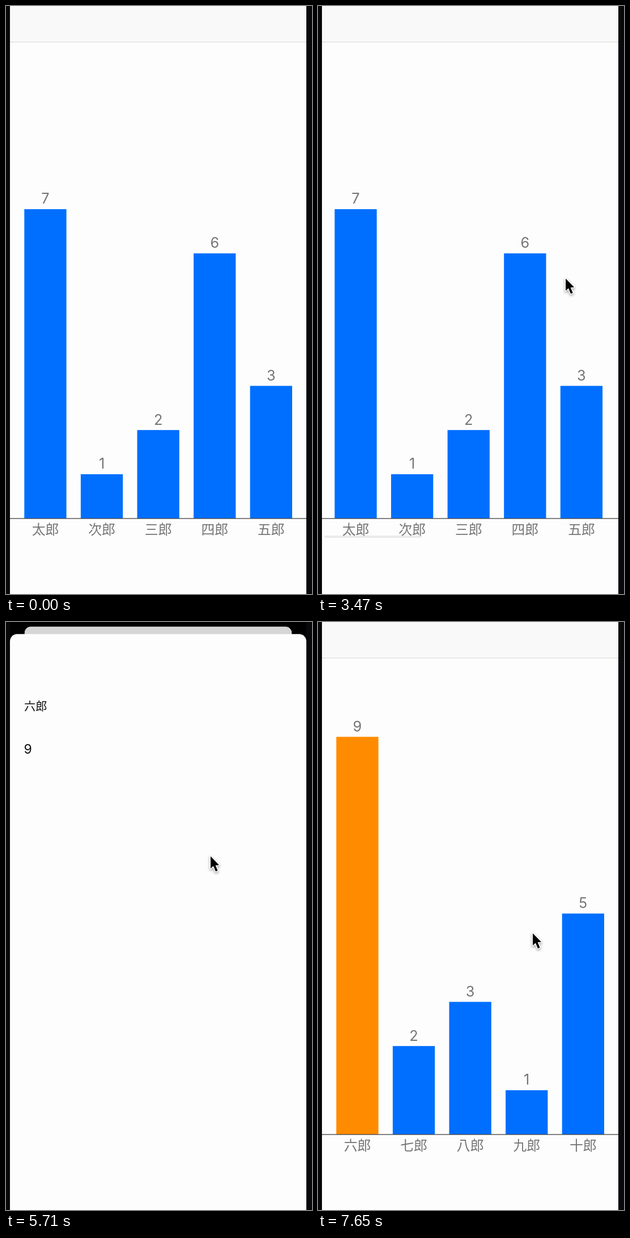
These frames come from a looping animation (540 by 1036 pixels, 7710 ms). An HTML page with a canvas:

```html
<!DOCTYPE html>
<html lang="ja">
<head>
<meta charset="utf-8">
<title>Bar chart</title>
<style>
  html, body { margin: 0; width: 100%; height: 100%; overflow: hidden; background: #000; }
  canvas { display: block; width: 540px; height: 1036px; }
</style>
</head>
<body>
<canvas id="stage" width="540" height="1036"></canvas>
<script>
const ctx = document.getElementById('stage').getContext('2d');
const LOOP = 7710;

// Phone screen; its top and bottom lie outside the stage.
const LEFT = 7, WIDTH = 523, TOP = -47, BOTTOM = 1085, MID = LEFT + WIDTH / 2;
const SHEET_TOP = 21.2, TRAVEL = BOTTOM - SHEET_TOP;
const SCREEN_R = 50, CARD_R = 12.6;
const BASE = 902.8, UNIT = 77.83, BAR = 74.3, GAP = 25.3;
const DIGITS = 'Inter, "Liberation Sans", sans-serif';
const KANJI = '"Noto Sans CJK JP", "Noto Sans CJK", sans-serif';

const pages = [
  { names: ['太郎', '次郎', '三郎', '四郎', '五郎'], values: [7, 1, 2, 6, 3] },
  { names: ['六郎', '七郎', '八郎', '九郎', '十郎'], values: [9, 2, 3, 1, 5] }
];
const MAX = 9;

// Each sheet: opens, is dragged down to dropY, then released.
const sheets = [
  { open: 871, drag: 2490, release: 2601, dropY: 86, name: '四郎', value: 6 },
  { open: 4802, drag: 5960, release: 6098, dropY: 160, name: '六郎', value: 9 }
];

const SWIPE = { start: 3460, end: 3636, pull: 260, tau: 100 };

// Pointer stops: time, x, y
const pointer = [
  [150, 548, 760], [680, 374, 625], [1750, 374, 625], [2350, 258, 592], [2490, 258, 592],
  [2601, 258, 657], [2850, 258, 657], [3380, 440, 480], [3460, 440, 480], [3636, 180, 457],
  [4100, 180, 457], [4650, 77, 465], [5200, 77, 465], [5800, 379, 409], [5960, 379, 409],
  [6098, 379, 548]
];

const clamp = v => Math.min(1, Math.max(0, v));
const mix = (a, b, k) => a + (b - a) * k;
const smooth = k => k * k * (3 - 2 * k);
const span = (t, a, b) => clamp((t - a) / (b - a));

// Remaining distance of a critically damped spring
function spring(ms) {
  const x = Math.max(0, ms) * 0.01826;
  return (1 + x) * Math.exp(-x);
}

function sheetState(t) {
  const sheet = sheets.find(s => t >= s.open && t < s.release + 700);
  if (!sheet) return null;
  if (t < sheet.drag) {
    const p = 1 - spring(t - sheet.open);
    return { sheet, y: BOTTOM - TRAVEL * p, shrink: p, shift: p };
  }
  const y = mix(SHEET_TOP, sheet.dropY, smooth(span(t, sheet.drag, sheet.release)));
  const shift = 1 - 1.28 * (y - SHEET_TOP) / TRAVEL;
  const r = spring(t - sheet.release);
  return { sheet, y: BOTTOM - (BOTTOM - y) * r, shrink: r, shift: shift * r };
}

function scrollOffset(t) {
  if (t < SWIPE.end) return SWIPE.pull * smooth(span(t, SWIPE.start, SWIPE.end));
  const rest = (WIDTH - SWIPE.pull) * Math.exp((SWIPE.end - t) / SWIPE.tau);
  return rest < 0.3 ? WIDTH : WIDTH - rest;
}

function rect(x, y, w, h, color) {
  ctx.fillStyle = color;
  ctx.fillRect(x, y, w, h);
}

function roundPath(x, y, w, h, r) {
  ctx.beginPath();
  ctx.roundRect(x, y, w, h, r);
}

function label(str, x, y, size, family, color, align = 'center', weight = 400) {
  ctx.font = `${weight} ${size}px ${family}`;
  ctx.textAlign = align;
  ctx.fillStyle = color;
  ctx.fillText(str, x, y);
}

function drawPage(page, left) {
  page.values.forEach((v, i) => {
    const x = left + GAP + i * (BAR + GAP), y = BASE - v * UNIT, mid = x + BAR / 2;
    rect(x, y, BAR, BASE - y, v === MAX ? '#ff8b00' : '#006fff');
    label(v, mid, y - 9.5, 25.3, DIGITS, '#757575');
    label(page.names[i], mid, 930.7, 23.8, KANJI, '#757575', 'center', 300);
  });
}

function drawIndicator(t, offset) {
  const alpha = Math.min(span(t, SWIPE.start, SWIPE.start + 60), 1 - span(t, 4200, 4450));
  if (!alpha) return;
  const track = WIDTH - 6;
  roundPath(LEFT + 3 + offset / 3 * track / WIDTH, 933, track / 3, 4, 2);
  ctx.fillStyle = `rgba(0,0,0,${0.4 * alpha})`;
  ctx.fill();
}

function drawCard(t, state) {
  const shrink = state ? state.shrink : 0, shift = state ? state.shift : 0;
  const scale = 1 - 0.0983 * shrink;
  const offset = scrollOffset(t);
  ctx.save();
  ctx.translate(MID, TOP + 55.3 * shift);
  ctx.scale(scale, scale);
  ctx.translate(-MID, -TOP);
  roundPath(LEFT, TOP, WIDTH, BOTTOM - TOP, mix(SCREEN_R, CARD_R, shift));
  ctx.clip();
  rect(LEFT, TOP, WIDTH, BOTTOM - TOP, '#fdfdfd');
  pages.forEach((page, i) => drawPage(page, LEFT + i * WIDTH - offset));
  rect(LEFT, 902.4, WIDTH, 1.2, '#333');
  drawIndicator(t, offset);
  rect(LEFT, TOP, WIDTH, 64 - TOP, '#f9f9f9');
  rect(LEFT, 63, WIDTH, 1, '#d6d6da');
  if (shift > 0) rect(LEFT, TOP, WIDTH, BOTTOM - TOP, `rgba(0,0,0,${0.14 * shift})`);
  ctx.restore();
}

function drawSheet({ sheet, y }) {
  roundPath(LEFT, y, WIDTH, BOTTOM + 40, CARD_R);
  ctx.fillStyle = '#fdfdfd';
  ctx.fill();
  label(sheet.name, 32, y + 135.2, 20.2, KANJI, '#111', 'left');
  label(sheet.value, 31.5, y + 211, 23, DIGITS, '#111', 'left');
}

function drawPointer(t) {
  if (t < pointer[0][0]) return;
  const next = pointer.findIndex(p => p[0] > t);
  const b = pointer[next < 0 ? pointer.length - 1 : next];
  const a = next < 0 ? b : pointer[next - 1];
  const k = a === b ? 1 : smooth(span(t, a[0], b[0]));
  ctx.save();
  ctx.translate(mix(a[1], b[1], k), mix(a[2], b[2], k));
  ctx.beginPath();
  [[0, 0.5], [0, 22], [4.9, 17.6], [9, 27.2], [12.6, 25.7], [8.6, 16.3], [15, 15.8]]
    .forEach(p => ctx.lineTo(...p));
  ctx.closePath();
  ctx.lineJoin = 'round';
  ctx.lineWidth = 3;
  ctx.strokeStyle = '#fff';
  ctx.shadowColor = 'rgba(0,0,0,.4)';
  ctx.shadowBlur = 4;
  ctx.shadowOffsetY = 2;
  ctx.stroke();
  ctx.shadowColor = 'transparent';
  ctx.fillStyle = '#000';
  ctx.fill();
  ctx.restore();
}

function draw(t) {
  const state = sheetState(t);
  rect(0, 0, 540, 1036, '#08080a');
  ctx.save();
  roundPath(LEFT, TOP, WIDTH, BOTTOM - TOP, SCREEN_R);
  ctx.clip();
  rect(LEFT, 0, WIDTH, 1036, '#000');
  drawCard(t, state);
  if (state) drawSheet(state);
  ctx.restore();
  drawPointer(t);
}

const start = performance.now();
function tick() {
  draw((performance.now() - start) % LOOP);
  requestAnimationFrame(tick);
}
tick();
</script>
</body>
</html>
```
